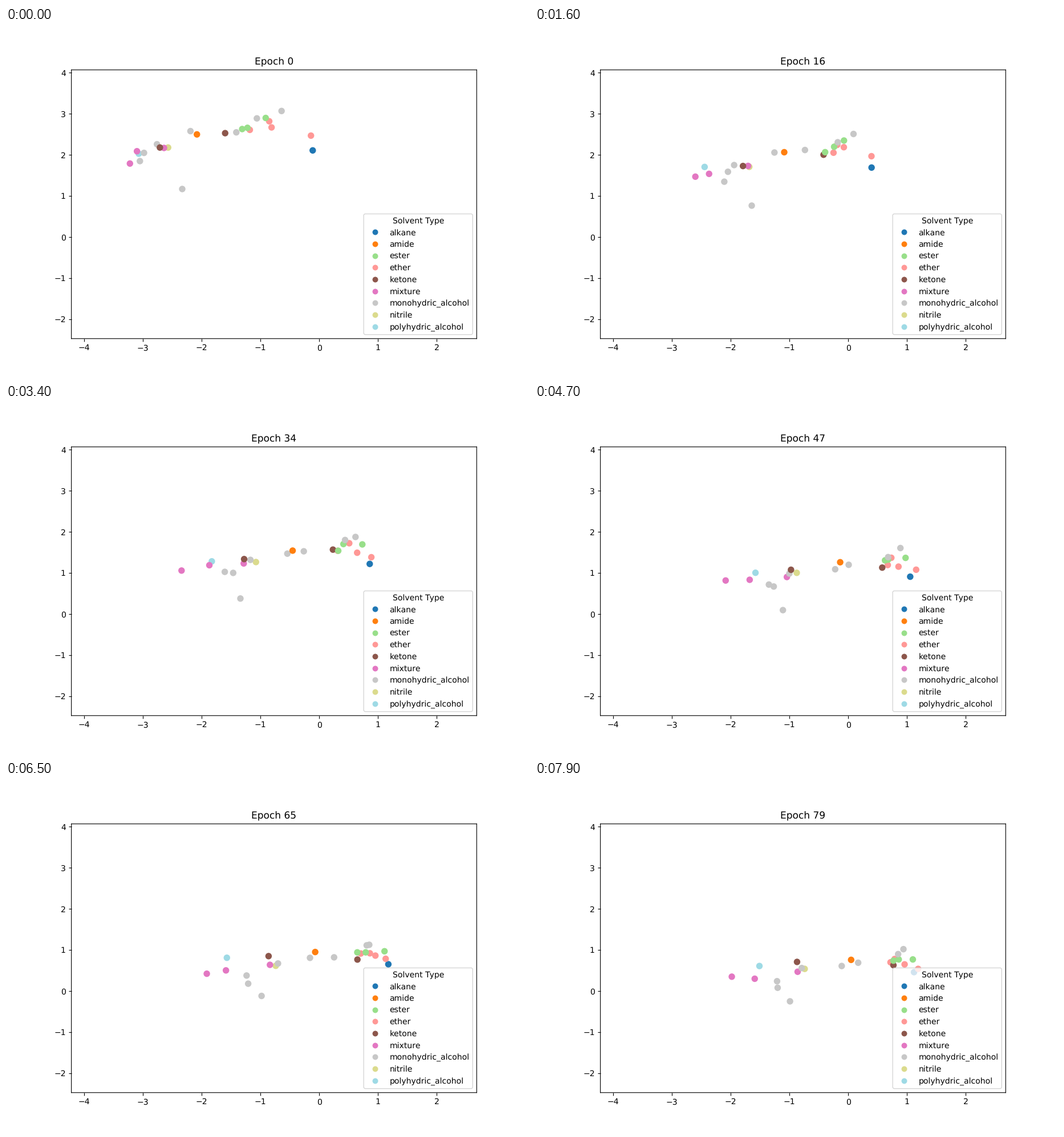
Animation, 917 px wide and 611 px high, one loop 8000 ms. Source, as a matplotlib script:

```python
import numpy as np
import matplotlib.pyplot as plt
from matplotlib.animation import FuncAnimation
from matplotlib.lines import Line2D

# Unhinted text and unsnapped lines give smooth, subpixel placement.
plt.rcParams.update({"text.hinting": "no_hinting", "text.hinting_factor": 1,
                     "path.snap": False})

W, H, DPI = 917, 611, 917 / 9
EPOCHS = 80

KINDS = ["alkane", "amide", "ester", "ether", "ketone", "mixture",
         "monohydric_alcohol", "nitrile", "polyhydric_alcohol"]
COLORS = dict(zip(KINDS, plt.get_cmap("tab20")(np.linspace(0, 1, len(KINDS)))))
ALCOHOL = "monohydric_alcohol"

# Solvents from back to front: kind, first position, last position.
SOLVENTS = [
    ("alkane", (-0.11, 2.11), (1.12, 0.46)),
    ("polyhydric_alcohol", (-3.07, 2.03), (-1.51, 0.61)),
    ("nitrile", (-2.57, 2.18), (-0.74, 0.54)),
    ("mixture", (-2.64, 2.17), (-0.86, 0.47)),
    ("mixture", (-3.10, 2.09), (-1.59, 0.30)),
    ("mixture", (-3.22, 1.79), (-1.98, 0.35)),
    (ALCOHOL, (-3.05, 1.85), (-1.21, 0.24)),
    (ALCOHOL, (-2.98, 2.05), (-1.20, 0.08)),
    (ALCOHOL, (-2.33, 1.17), (-0.99, -0.25)),
    (ALCOHOL, (-2.76, 2.26), (-0.79, 0.56)),
    (ALCOHOL, (-2.19, 2.58), (-0.11, 0.61)),
    ("ether", (-1.18, 2.61), (0.72, 0.70)),
    ("ether", (-0.85, 2.82), (0.79, 0.78)),
    ("ether", (-0.81, 2.67), (0.96, 0.65)),
    ("ether", (-0.14, 2.47), (1.19, 0.54)),
    ("ketone", (-2.71, 2.18), (-0.87, 0.71)),
    ("ketone", (-1.60, 2.53), (0.77, 0.63)),
    ("ester", (-1.31, 2.63), (0.77, 0.74)),
    ("ester", (-1.22, 2.66), (0.86, 0.77)),
    ("ester", (-0.91, 2.90), (1.10, 0.77)),
    (ALCOHOL, (-1.06, 2.89), (0.85, 0.90)),
    (ALCOHOL, (-0.64, 3.07), (0.94, 1.02)),
    ("amide", (-2.08, 2.50), (0.05, 0.76)),
    (ALCOHOL, (-1.41, 2.55), (0.17, 0.69)),
]
EASE = np.array([2.8, 1.4])     # ease-out power along x and y
JITTER = np.array([0.07, 0.05])  # sampling noise along x and y


def simulate():
    """Ease every dot from first to last position, with noise in between."""
    kinds, first, last = zip(*SOLVENTS)
    first, last = np.array(first), np.array(last)
    t = np.linspace(0, 1, EPOCHS)[:, None, None]
    noise = np.random.default_rng(4).normal(size=(EPOCHS, len(kinds), 2))
    noise[[0, -1]] = 0
    path = first + (last - first) * (1 - (1 - t) ** EASE)
    return kinds, path + JITTER * noise.clip(-1.5, 1.5)


kinds, path = simulate()

fig, ax = plt.subplots(figsize=((W + 0.01) / DPI, (H + 0.01) / DPI), dpi=DPI)
ax.set_xlim(-4.216, 2.68)
ax.set_ylim(-2.473, 4.071)
dots = ax.scatter(*path[0].T, s=50, c=[COLORS[k] for k in kinds])
title = ax.set_title("Epoch 0")
handles = [Line2D([0], [0], marker="o", color="w", markerfacecolor=COLORS[k],
                  markersize=8, label=k) for k in KINDS]
ax.legend(handles=handles, title="Solvent Type", loc="lower right")


def update(epoch):
    dots.set_offsets(path[epoch])
    title.set_text(f"Epoch {epoch}")
    return dots, title


anim = FuncAnimation(fig, update, frames=EPOCHS, interval=100, repeat=True,
                     repeat_delay=0, blit=False)
plt.show()
```
